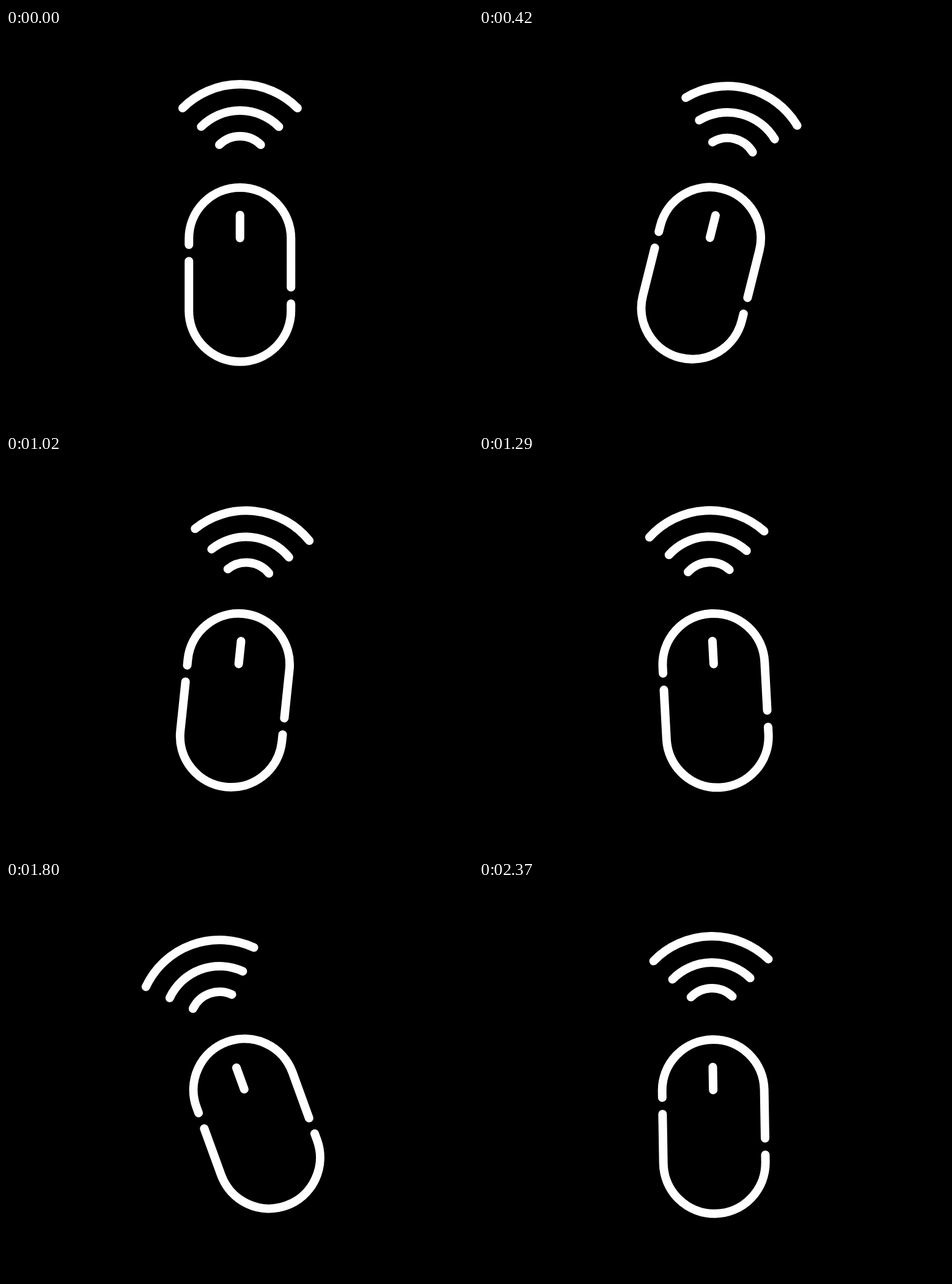
Write an HTML page that moves like this. It is 764 by 651 pixels and loops after 2400 ms.

```html
<!DOCTYPE html>
<html lang="en">
<head>
<meta charset="utf-8">
<title>Wireless mouse</title>
<style>
  html, body { margin: 0; width: 100%; height: 100%; overflow: hidden; background: #000; }
  svg { display: block; width: 764px; height: 651px; }
  path { fill: none; stroke: #fff; stroke-width: 14; stroke-linecap: round; }
</style>
</head>
<body>
<svg viewBox="0 0 764 651">
  <g id="mouse">
    <!-- signal waves -->
    <path d="M288.8 131A133 133 0 0 1 476.8 131"/>
    <path d="M319.2 161.4A90 90 0 0 1 446.4 161.4"/>
    <path d="M348.9 191A48 48 0 0 1 416.7 191"/>
    <!-- body halves and wheel -->
    <path d="M299.3 354.5V344.5A83.5 83.5 0 0 1 466.3 344.5V424"/>
    <path d="M466.3 451V462.3A83.5 83.5 0 0 1 299.3 462.3V381.5"/>
    <path d="M382.8 306V343.5"/>
  </g>
</svg>
<script>
  const LOOP = 2400, SWING = 20;
  const mouse = document.getElementById('mouse');

  // Triangle wave: 0, 1, 0, -1 at the quarters of the loop
  const triangle = p => 1 - Math.abs(((p + 0.25) % 1) * 4 - 2);

  function draw() {
    const angle = SWING * triangle(performance.now() / LOOP);
    mouse.setAttribute('transform', `rotate(${angle} 382.8 323)`);
    requestAnimationFrame(draw);
  }
  draw();
</script>
</body>
</html>
```
